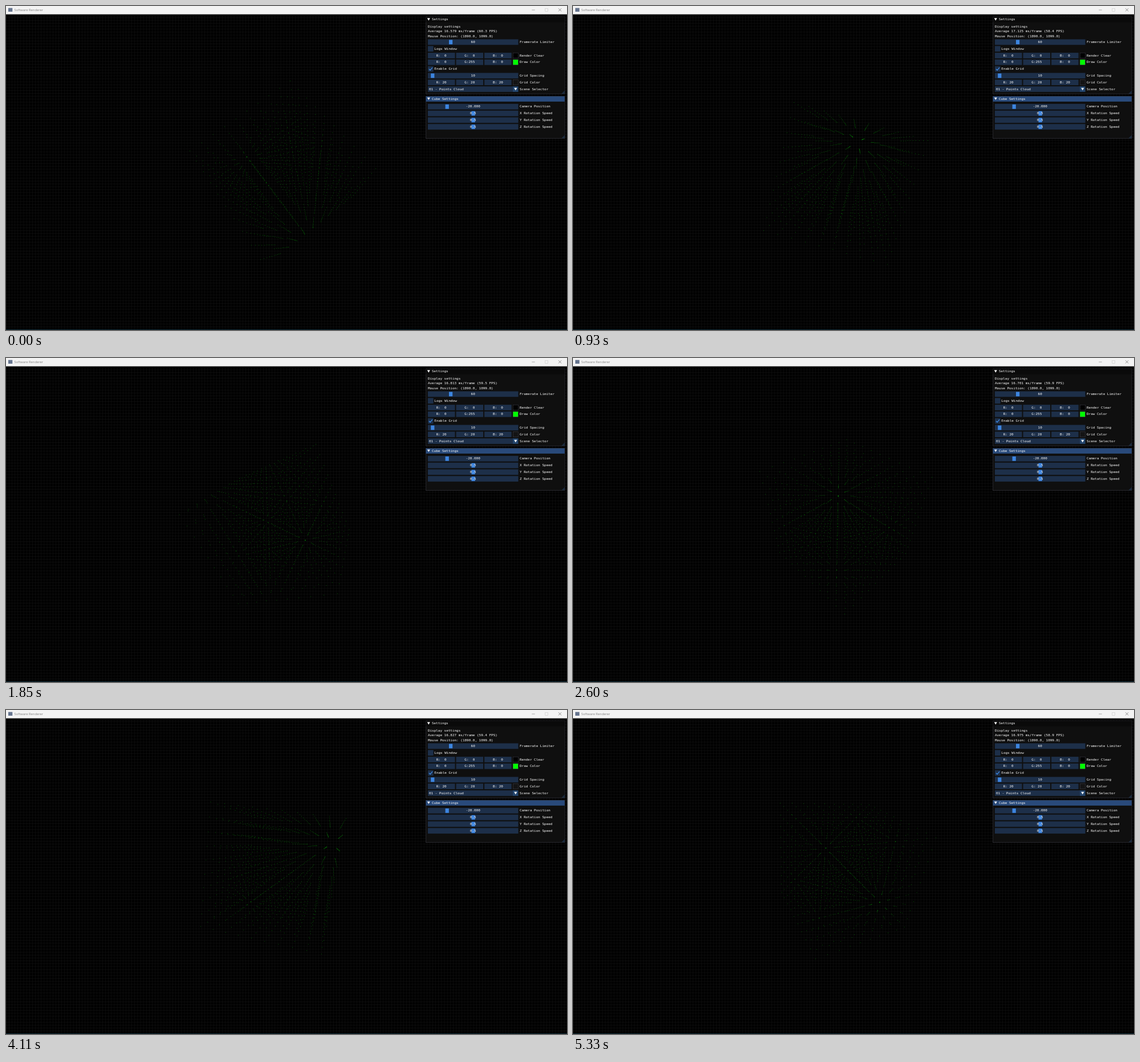
Recreate the animation shown at these times as an HTML page with a canvas. Size 984x569 px, loop 5400 ms.

```html
<!DOCTYPE html>
<html lang="en">
<head>
<meta charset="utf-8">
<title>Software Renderer</title>
<style>
html, body { margin: 0; width: 100%; height: 100%; overflow: hidden; background: #000; }
canvas { display: block; }
</style>
</head>
<body>
<canvas id="stage" width="984" height="569"></canvas>
<script>
const W = 984, H = 569, LOOP = 5400;
const SCALE = W / 1920;              // the window is shown scaled down from 1920 px
const TOP = 14.9;                    // height of the title bar
const FOCAL = 393 / SCALE, CAMERA = 20;
const STEP = 66.5, LAST_STEP = 80;

// step, rotation in degrees, average frame time in ms
const KEYS = [
  [0, 71.1, 16.579], [14, 97.9, 17.125], [28, 124.4, 16.813], [39, 145.4, 16.701],
  [53, 172.5, 16.919], [70, 205.2, 16.746], [80, 224.7, 16.975]
];

const MONO = '11.63px "DejaVu Sans Mono", monospace';
const FRAME = '#1d2f49', GRAB = '#3d85e0', BORDER = '#40404a', PANEL = '#0f0f0f';

const ctx = document.getElementById('stage').getContext('2d');
const backdrop = document.createElement('canvas');
backdrop.width = W;
backdrop.height = H;
const back = backdrop.getContext('2d');

function box(x, y, w, h, color) {
  back.fillStyle = color;
  back.fillRect(x, y, w, h);
}

function shape(color, ...points) {
  back.fillStyle = color;
  back.beginPath();
  points.forEach(([x, y]) => back.lineTo(x, y));
  back.fill();
}

function stroke(color, width, ...points) {
  back.strokeStyle = color;
  back.lineWidth = width;
  back.beginPath();
  points.forEach(([x, y], i) => i ? back.lineTo(x, y) : back.moveTo(x, y));
  back.stroke();
}

function text(c, str, x, y, align = 'left', font = MONO, color = '#fff') {
  c.save();
  c.translate(x, y);
  c.scale(SCALE, SCALE);
  c.font = font;
  c.fillStyle = color;
  c.textAlign = align;
  c.textBaseline = 'middle';
  c.fillText(str, 0, 0);
  c.restore();
}

const label = (str, x, y, align) => text(back, str, x, y, align);

function field(x, y, w, value) {
  box(x, y - 4.9, w, 9.75, FRAME);
  if (value) label(value, x + w / 2, y, 'center');
}

function slider(y, value, grabX, name) {
  field(739.9, y, 158.7);
  box(grabX - 3.1, y - 3.9, 6.2, 7.8, GRAB);
  label(value, 819.2, y, 'center');
  label(name, 901, y);
}

function colorRow(y, values, swatch, name) {
  ['R:', 'G:', 'B:'].forEach((channel, i) =>
    field(739.9 + i * 49.6, y, 47.6, channel + values[i].padStart(3)));
  box(889, y - 4.9, 9.6, 9.75, BORDER);
  box(889.5, y - 4.4, 8.6, 8.75, swatch);
  label(name, 901, y);
}

function checkbox(y, name, checked) {
  field(739.9, y, 9.75);
  if (checked) stroke('#4296fa', 1.1, [742, y], [744, y + 2.3], [748, y - 2.6]);
  label(name, 751.3, y);
}

function panel(y, h, title, titleColor) {
  box(736, y, 244.4, h, BORDER);
  box(736.5, y + 0.5, 243.4, h - 1, PANEL);
  box(736.5, y + 0.5, 243.4, 9.2, titleColor);
  const mid = y + 4.7;
  shape('#fff', [738.8, mid - 2.2], [743.8, mid - 2.2], [741.3, mid + 2.2]);
  label(title, 747, mid + 0.2);
  shape('#1a2a3e', [979.9, y + h - 6], [979.9, y + h - 0.5], [974.4, y + h - 0.5]);
}

function drawGrid() {
  const gap = 10 * SCALE;
  for (let x = 0; x < W; x += gap) box(x, TOP, 0.56, H - TOP, '#141414');
  for (let y = TOP; y < H; y += gap) box(0, y, W, 0.56, '#141414');
}

function drawTitleBar() {
  box(0, 0, W, 14.6, '#f3f3f3');
  box(4, 3.5, 7.3, 6.5, '#66758f');
  text(back, 'Software Renderer', 14.6, 7.2, 'left', '11.3px "Open Sans", sans-serif', '#808080');
  stroke('#777', 0.6, [922.3, 7], [927.7, 7]);
  back.strokeStyle = '#c8c8c8';
  back.strokeRect(945.8, 4.6, 4.8, 4.8);
  stroke('#666', 0.7, [969, 4.2], [974.2, 9.4]);
  stroke('#666', 0.7, [974.2, 4.2], [969, 9.4]);
}

function drawBackdrop() {
  box(0, 0, W, H, '#000');
  drawGrid();
  box(0, 568.3, W, 0.7, '#123a4c');
  drawTitleBar();

  panel(18.8, 135.8, 'Settings', '#0a0a0a');
  label('Display settings', 739.9, 36);
  label('Mouse Position: (1890.0, 1099.0)', 739.9, 53.4);
  slider(63.4, '60', 780.1, 'Framerate Limiter');
  checkbox(75.2, 'Logs Window', false);
  colorRow(87, ['0', '0', '0'], '#000', 'Render Clear');
  colorRow(98.8, ['0', '255', '0'], '#0f0', 'Draw Color');
  checkbox(110.6, 'Enable Grid', true);
  slider(122.4, '10', 748.3, 'Grid Spacing');
  colorRow(134.2, ['20', '20', '20'], '#141414', 'Grid Color');
  field(739.9, 146, 149);
  box(888.9, 141.1, 9.7, 9.75, '#23456d');
  shape('#fff', [891.2, 143.8], [896.4, 143.8], [893.8, 148.3]);
  label('01 - Points Cloud', 741.9, 146);
  label('Scene Selector', 901, 146);

  panel(158.2, 74.6, 'Cube Settings', '#294a7a');
  slider(176.8, '-20.000', 773.7, 'Camera Position');
  ['X', 'Y', 'Z'].forEach((axis, i) =>
    slider(188.6 + i * 11.8, '0.5', 819.6, axis + ' Rotation Speed'));
}

function sample(step) {
  let i = 1;
  while (i < KEYS.length - 1 && step > KEYS[i][0]) i++;
  const a = KEYS[i - 1], b = KEYS[i];
  const k = (step - a[0]) / (b[0] - a[0]);
  return { angle: (a[1] + (b[1] - a[1]) * k) * Math.PI / 180, ms: a[2] + (b[2] - a[2]) * k };
}

// Rotates about X, then Y, then Z by the same angle.
function rotate(x, y, z, s, c) {
  [y, z] = [y * c - z * s, y * s + z * c];
  [x, z] = [x * c - z * s, x * s + z * c];
  [x, y] = [x * c - y * s, x * s + y * c];
  return [x, y, z];
}

function drawCloud(angle) {
  const s = Math.sin(angle), c = Math.cos(angle);
  ctx.save();
  ctx.translate(0, TOP);
  ctx.scale(SCALE, SCALE);
  ctx.fillStyle = '#0f0';
  for (let i = -5; i < 5; i++)
    for (let j = -5; j < 5; j++)
      for (let k = -5; k < 5; k++) {
        const [x, y, z] = rotate(i, j, k, s, c);
        const zoom = FOCAL / (z + CAMERA);
        ctx.fillRect(Math.floor(960 + x * zoom), Math.floor(540 + y * zoom), 1.1, 1.1);
      }
  ctx.restore();
}

function render(now) {
  const step = Math.min(LAST_STEP, Math.floor((now % LOOP + 15) / STEP));
  const { angle, ms } = sample(step);
  ctx.drawImage(backdrop, 0, 0);
  drawCloud(angle);
  text(ctx, `Average ${ms.toFixed(3)} ms/frame (${(1000 / ms).toFixed(1)} FPS)`, 739.9, 44.6);
}

drawBackdrop();
const start = performance.now();
function tick() {
  render(performance.now() - start);
  requestAnimationFrame(tick);
}
tick();
</script>
</body>
</html>
```
